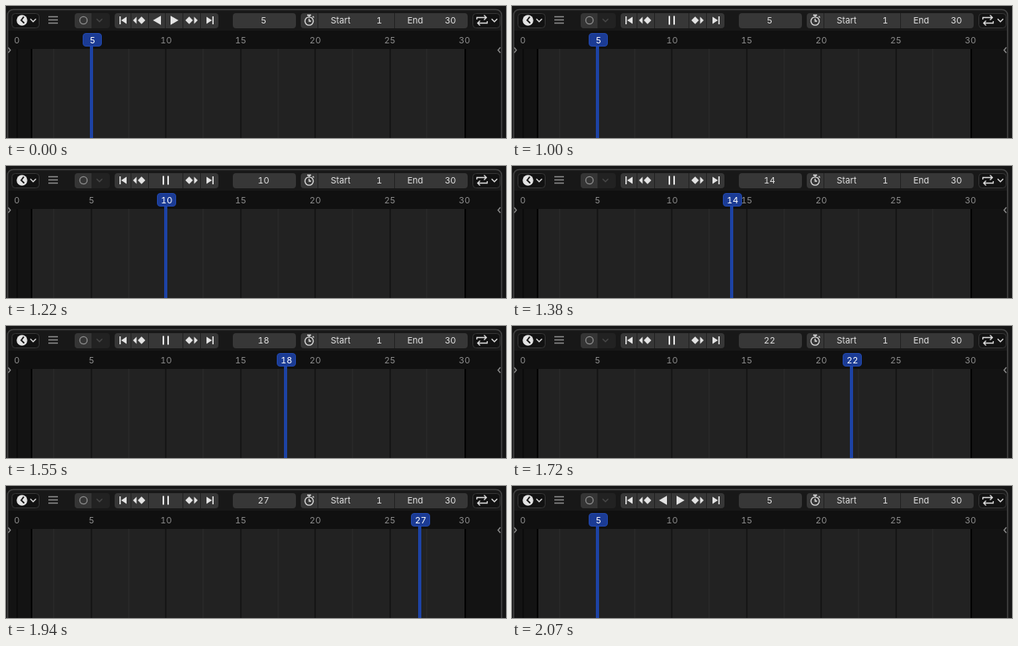
Animation, 626 px wide and 166 px high, one loop 2.12 s. Source, as an HTML page:

```html
<!DOCTYPE html>
<html lang="en">
<head>
<meta charset="utf-8">
<title>Timeline playback</title>
<style>
  html, body { margin: 0; width: 100%; height: 100%; overflow: hidden; background: #161616; }
  svg { display: block; width: 626px; height: 166px; }
  text { font: 11px Inter, sans-serif; font-feature-settings: "tnum"; fill: #e2e2e2; }
  .mid { text-anchor: middle; }
  .end { text-anchor: end; }
  .ruler text { fill: #8c8c8c; }
  .field { fill: #373737; }
  .menu { fill: #121212; stroke: #363636; }
  .gap { stroke: #222; }
  .icon { fill: #e4e4e4; }
  .line { fill: none; stroke: #dedede; stroke-width: 1.3; }
  .dim { stroke: #8c8c8c; }
</style>
</head>
<body>
<svg viewBox="0 0 626 166">
  <defs>
    <path id="chevron" d="M-3.5 -1.7L0 1.8L3.5 -1.7"/>
    <g id="keyJump"><path d="M-8 0L-3.5 -4.5V4.5Z"/><path d="M-2 0L2.7 -4.7L7.4 0L2.7 4.7Z"/></g>
    <g id="endJump"><path d="M-5 -5H-3.4V5H-5ZM-2.8 0L4 -4.5V4.5Z"/></g>
    <path id="play" d="M-5 0L5 -5.7V5.7Z"/>
  </defs>

  <rect x="2" y="4.5" width="618.5" height="190" rx="7" fill="#181818"/>
  <rect x="2" y="31" width="618" height="23" fill="#101010"/>
  <rect x="2" y="54" width="618" height="112" fill="#131313"/>
  <rect x="32" y="54" width="543" height="112" fill="#222"/>
  <g id="grid"></g>
  <path d="M32 54V166M575 54V166" stroke="#000" stroke-width="2"/>
  <g class="ruler mid" id="ruler"></g>
  <path class="line dim" d="M2.5 52L5.5 55.5L2.5 59M619 52L616 55.5L619 59"/>
  <rect x="2" y="4.5" width="618.5" height="190" rx="7" fill="none" stroke="#444" stroke-width="1.5"/>

  <!-- editor and menu buttons -->
  <rect class="menu" x="7.5" y="9.5" width="34" height="18" rx="4"/>
  <circle class="icon" cx="20" cy="18" r="6.7"/>
  <path d="M22.3 13.5L19 18L22.8 21.5" fill="none" stroke="#161616" stroke-width="1.7"/>
  <use href="#chevron" class="line" x="34" y="18"/>
  <path class="line dim" stroke-width="1" d="M53 13.5H65M53 17.5H65M53 21.5H65"/>

  <!-- auto keying -->
  <rect x="86" y="9" width="44" height="19" rx="4" fill="#222"/>
  <path d="M90 9H107V28H90Q86 28 86 24V13Q86 9 90 9Z" fill="#353535"/>
  <circle class="line dim" cx="97" cy="18" r="4.6"/>
  <use href="#chevron" class="line" style="stroke:#484848" x="117" y="18"/>

  <!-- transport -->
  <rect class="field" x="136" y="9" width="130" height="19" rx="4"/>
  <path class="gap" d="M156.500 9V28M178.500 9V28M221.500 9V28M243.500 9V28"/>
  <g class="icon">
    <use href="#endJump" x="147" y="18"/>
    <use href="#keyJump" x="167" y="18"/>
    <use href="#keyJump" transform="translate(232 18) scale(-1 1)"/>
    <use href="#endJump" transform="translate(255 18) scale(-1 1)"/>
    <g id="idle">
      <path class="gap" d="M199.500 9V28"/>
      <use href="#play" x="189" y="18"/>
      <use href="#play" transform="translate(211 18) scale(-1 1)"/>
    </g>
    <path id="pause" d="M196 12.500H198V23.500H196ZM202 12.500H204V23.500H202Z"/>
  </g>

  <!-- frame fields -->
  <rect class="field" x="284" y="9" width="79" height="19" rx="4"/>
  <text class="mid" id="count" x="322.500" y="22">5</text>
  <rect class="field" x="369" y="9" width="209" height="19" rx="4"/>
  <path class="gap" d="M390.500 9V28M486.500 9V28"/>
  <circle class="line" cx="379.500" cy="19" r="5.200"/>
  <path class="line" d="M377 11.500H382M379.500 12V14M379.500 16V19H382M384 13L385.500 14.500"/>
  <text x="406.500" y="22">Start</text>
  <text class="end" x="471" y="22">1</text>
  <text x="502.500" y="22">End</text>
  <text class="end" x="563.500" y="22">30</text>

  <!-- loop mode -->
  <rect class="menu" x="584.500" y="9.500" width="34" height="18" rx="4"/>
  <path class="line" d="M589.500 17V14.500H601M598.500 11.500L601.500 14.500L598.500 17.500M602.500 19V21.500H591M593.500 18.500L590.500 21.500L593.500 24.500"/>
  <use href="#chevron" class="line" x="611.500" y="18"/>

  <g id="head">
    <rect x="-2" y="48" width="4" height="118" fill="#1d43a5"/>
    <rect x="-10.500" y="34.500" width="23" height="16" rx="3.500" fill="#1b3b94" stroke="#2148ad"/>
    <text class="mid" id="badge" x="1.200" y="46.500" style="fill:#fff">5</text>
  </g>
</svg>
<script>
  const LOOP = 2120, START = 1000, STOP = 2070, FIRST = 5, LAST = 29;
  const LONG = [5, 8, 17, 20, 22, 25, 28]; // held 50 ms, others 40 ms
  const $ = id => document.getElementById(id);
  const xOf = frame => 13.6 + 18.68 * frame;

  let lines = "", labels = "";
  for (let n = 0; n < 30; n += 2.5) {
    const major = n % 5 === 0;
    const color = n === 0 ? "#0c0c0c" : major ? "#161616" : "#292929";
    lines += `<rect x="${Math.round(xOf(n)) - 1}" y="54" width="${major ? 2 : 1.5}" height="112" fill="${color}"/>`;
  }
  for (let n = 0; n <= 30; n += 5) {
    labels += `<text x="${xOf(n)}" y="47">${n}</text>`;
  }
  $("grid").innerHTML = lines;
  $("ruler").innerHTML = labels;

  function frameAt(t) {
    if (t < START || t >= STOP) return FIRST;
    let frame = FIRST, next = START;
    while (frame < LAST) {
      next += LONG.includes(frame) ? 50 : 40;
      if (t < next) break;
      frame++;
    }
    return frame;
  }

  function draw(now) {
    const t = now % LOOP;
    const playing = t >= START && t < STOP;
    const frame = frameAt(t);
    $("idle").style.display = playing ? "none" : "";
    $("pause").style.display = playing ? "" : "none";
    $("count").textContent = $("badge").textContent = frame;
    $("head").setAttribute("transform", `translate(${Math.round(xOf(frame))} 0)`);
  }

  const origin = performance.now();
  function tick() {
    draw(performance.now() - origin);
    requestAnimationFrame(tick);
  }
  tick();
</script>
</body>
</html>
```
